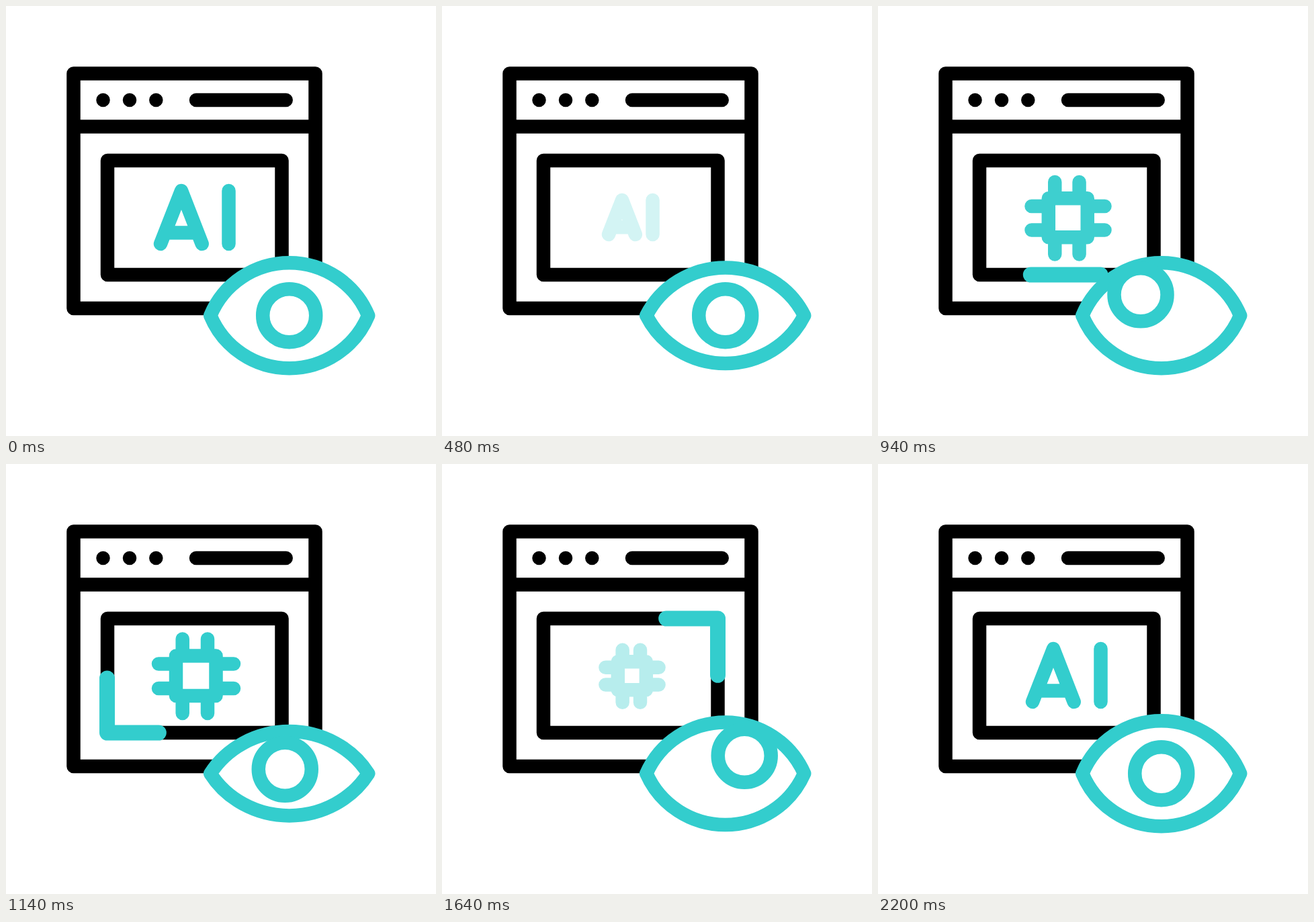
These frames come from a looping animation (640 by 640 pixels, 2400 ms). An HTML page:

```html
<!DOCTYPE html>
<html>
<head>
<meta charset="utf-8">
<style>
html, body { margin: 0; width: 100%; height: 100%; overflow: hidden; background: #fff; }
svg { display: block; }
path, circle { fill: none; stroke-width: 20.5; stroke-linecap: round; stroke-linejoin: round; vector-effect: non-scaling-stroke; }
.ink { stroke: #000; }
.teal { stroke: #33cdcd; }
</style>
</head>
<body>
<svg width="640" height="640" viewBox="0 0 640 640">
  <path class="ink" d="M100.5 100.5H460.5V450H100.5ZM100.5 179.5H460.5M144.5 140h.01M184 140h.01M223.3 140h.01M283 140H416.7M151 230H410.5V400H151Z"/>
  <path id="letters" class="teal" d="M230 354L261 275L291.7 354M237 337.5H285M331.5 275V354"/>
  <path id="chip" class="teal" d="M253 285.5H312.5V345H253ZM262.7 260.5v25M300 260.5v25M262.7 345v26M300 345v26M227 297.5h26M227 334h26M312.5 297.5h26.5M312.5 334h26.5"/>
  <path id="tracer" class="teal" style="stroke-width:23" pathLength="860" d="M355.5 400H150.5V230H410.5V400Z"/>
  <path id="lids" class="teal" style="fill:#fff"/>
  <circle id="pupil" class="teal" r="39.5"/>
</svg>
<script>
const $ = id => document.getElementById(id);
const LOOP = 2400;

// Smooth 0..1 ramp between two times
const ease = (t, a, b) => {
  const x = Math.min(1, Math.max(0, (t - a) / (b - a)));
  return x * x * (3 - 2 * x);
};

// Fades a symbol while scaling it about its centre; line weight stays constant
function show(el, amount, cx, cy) {
  const s = 0.55 + 0.45 * amount;
  el.style.opacity = amount;
  el.setAttribute('transform', `translate(${cx} ${cy}) scale(${s}) translate(${-cx} ${-cy})`);
}

function lidPath(q) {
  const cx = 421.7, cy = 460.7, w = 117.5, h = 78.5 - 20 * q;
  const hx = 19.7 + 5 * q, hy = 47.5 - 13 * q, k = 51.4 - 2 * q;
  const half = (d, v) =>
    `C${cx - d * (w - hx)} ${cy + v * hy} ${cx - d * k} ${cy + v * h} ${cx} ${cy + v * h}` +
    `C${cx + d * k} ${cy + v * h} ${cx + d * (w - hx)} ${cy + v * hy} ${cx + d * w} ${cy}`;
  return `M${cx - w} ${cy}` + half(1, -1) + half(-1, 1) + 'Z';
}

function draw(t) {
  show($('letters'), 1 - ease(t, 200, 600) + ease(t, 1800, 2200), 280.8, 314.5);
  show($('chip'), ease(t, 600, 1000) - ease(t, 1400, 1800), 283, 315.5);

  // The tail follows the head 200 ms later
  const head = 860 * ease(t, 600, 2000), tail = 860 * ease(t, 800, 2200);
  const len = head - tail, tracer = $('tracer');
  tracer.style.display = len > 0.5 ? '' : 'none';
  tracer.setAttribute('stroke-dasharray', `0 ${tail} ${len} 2000`);
  tracer.style.strokeLinecap = 'round';
  // Skip the zero-length first dash, which would paint a dot at the start
  tracer.setAttribute('stroke-dasharray', `${len} 2000`);
  tracer.setAttribute('stroke-dashoffset', -tail);

  const squint = ease(t, 400, 600) - ease(t, 600, 800)
    + ease(t, 1000, 1200) - ease(t, 1200, 1400)
    + ease(t, 1600, 1800) - ease(t, 1800, 2200);
  $('lids').setAttribute('d', lidPath(squint));

  const left = ease(t, 600, 800) - ease(t, 1000, 1200);
  const right = ease(t, 1200, 1400) - ease(t, 1600, 1800);
  $('pupil').setAttribute('cx', 421.7 - 30.7 * left + 32 * right);
  $('pupil').setAttribute('cy', 460.7 - 31 * left - 29.7 * right);
}

const start = performance.now();
function tick() {
  draw((performance.now() - start) % LOOP);
  requestAnimationFrame(tick);
}
tick();
</script>
</body>
</html>
```
